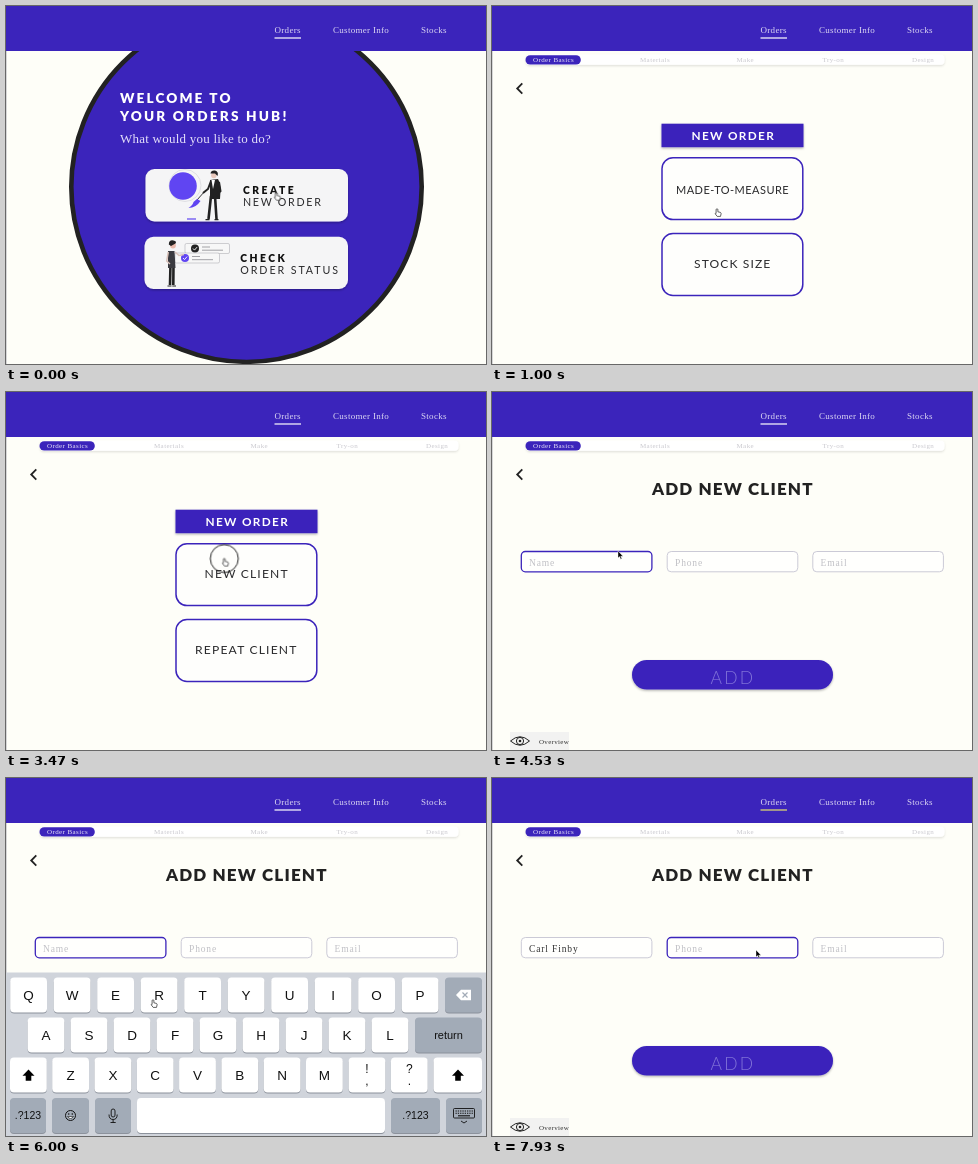
An HTML page for the animation above (8000 ms loop, 480 px wide and 358 px high).

```html
<!DOCTYPE html>
<html lang="en">
<head>
<meta charset="utf-8">
<title>Orders hub</title>
<style>
html, body { margin: 0; width: 100%; height: 100%; overflow: hidden; background: #000; }
svg { display: block; width: 100vw; height: 100vh; }
.sans { font-family: Lato, sans-serif; fill: #2a2a2c; }
.serif { font-family: "Liberation Serif", serif; }
.key { font-family: "Liberation Sans", sans-serif; fill: #111; text-anchor: middle; }
.b { font-weight: 700; }
.black { font-weight: 900; }
.light { font-weight: 300; }

/* 1% of the loop is 80 ms */
.hub, .flow, .kinds, .clients, .form, .empty, .filled, .line, .keyboard,
.cursor, .arrow, .hand, .ring { animation: 8s linear infinite; }

/* Both layers cross over black, which dims the middle of the dissolve. */
.hub { animation-name: leave; }
.flow { animation-name: enter; }
@keyframes leave { 0%, 9.125% { opacity: 1 } 12.5%, 100% { opacity: 0 } }
@keyframes enter { 0%, 9.125% { opacity: 0 } 12.5%, 100% { opacity: 1 } }

.kinds { animation-name: kinds; }
.clients { animation-name: clients; }
@keyframes kinds { 0%, 22.5% { opacity: 1 } 24.2%, 100% { opacity: 0 } }
@keyframes clients { 0%, 22.5% { opacity: 0 } 24.2%, 100% { opacity: 1 } }

.form { animation-name: form; }
@keyframes form { 0%, 44.6% { opacity: 0 } 45.8%, 100% { opacity: 1 } }

.empty { animation-name: empty; animation-timing-function: step-end; }
.filled { animation-name: filled; animation-timing-function: step-end; }
@keyframes empty { 0% { opacity: 1 } 85%, 100% { opacity: 0 } }
@keyframes filled { 0% { opacity: 0 } 85%, 100% { opacity: 1 } }

.line { animation-name: line; animation-timing-function: step-end; }
@keyframes line { 0% { stroke: #fff } 88.3%, 100% { stroke: #e6e36c } }

.keyboard { animation-name: keyboard; animation-timing-function: ease-out; }
@keyframes keyboard {
  0%, 60.5% { transform: translateY(168px) }
  65%, 82.5% { transform: none }
  86.8%, 100% { transform: translateY(168px) }
}

.cursor { animation-name: move; animation-timing-function: ease-in-out; }
@keyframes move {
  0%, 5% { transform: translate(270.3px, 186.7px) }
  10%, 34.1% { transform: translate(225px, 203px) }
  41.9%, 50% { transform: translate(218.3px, 166.6px) }
  53.1% { transform: translate(170px, 144px) }
  56.2%, 66.2% { transform: translate(126px, 159px) }
  70.6%, 75.1% { transform: translate(147px, 222px) }
  80.6%, 83.8% { transform: translate(454px, 327px) }
  88.4%, 90.9% { transform: translate(440px, 305px) }
  97.5%, 100% { transform: translate(264px, 172px) }
}
.arrow { animation-name: arrow; animation-timing-function: step-end; }
.hand { animation-name: hand; animation-timing-function: step-end; }
@keyframes arrow {
  0%, 11.5%, 60.5% { opacity: 0 }
  6.5%, 46%, 84%, 100% { opacity: 1 }
}
@keyframes hand {
  0%, 11.5%, 60.5% { opacity: 1 }
  6.5%, 46%, 84%, 100% { opacity: 0 }
}
.ring { animation-name: ring; animation-timing-function: step-end; }
@keyframes ring {
  0%, 5%, 22.3%, 45%, 59.9%, 82.6%, 100% { opacity: 0 }
  2.2%, 20%, 42.5%, 57.8%, 80.8% { opacity: 1 }
}
</style>
</head>
<body>
<svg id="stage" viewBox="0 0 480 358" preserveAspectRatio="none"></svg>
<script>
const BLUE = '#3b24bb', VIOLET = '#6045f2', PAPER = '#fefef8', DARK = '#222', GREY = '#a2abb7';

const text = (x, y, size, gap, cls, str, fill) =>
  `<text x="${x}" y="${y}" font-size="${size}" letter-spacing="${gap}" class="${cls}"` +
  `${fill ? ` style="fill:${fill}"` : ''}>${str}</text>`;
const box = (x, y, w, h, r, fill, more = '') =>
  `<rect x="${x}" y="${y}" width="${w}" height="${h}" rx="${r}" fill="${fill}" ${more}/>`;
const path = (d, stroke, width = 1, fill = 'none') =>
  `<path d="${d}" stroke="${stroke}" stroke-width="${width}" fill="${fill}"/>`;
const shape = (d, fill) => path(d, 'none', 0, fill);
const dot = (x, y, r, fill, more = '') =>
  `<circle cx="${x}" cy="${y}" r="${r}" fill="${fill}" ${more}/>`;
const group = (cls, ...parts) => `<g class="${cls}">${parts.join('')}</g>`;
const dropShadow = (id, alpha) =>
  `<filter id="${id}" x="-5%" y="-20%" width="110%" height="150%">
    <feDropShadow dx="0" dy="1.2" stdDeviation="1.2" flood-color="#000" flood-opacity="${alpha}"/>
  </filter>`;
const shadow = 'filter="url(#soft)"', faint = 'filter="url(#faint)"';

const header = () => group('',
  box(0, 0, 480, 45, 0, BLUE),
  [[268.5, 'Orders'], [327, 'Customer Info'], [415, 'Stocks']]
    .map(([x, s]) => text(x, 27, 9, .3, 'serif', s, '#dcd7f3')).join(''),
  '<path class="line" d="M268.5 32H295" stroke="#fff" stroke-width="1.2"/>',
  box(0, 45, .7, 313, 0, '#c6c6cb'));

const painter = () => group('',
  dot(179, 179.5, 16, 'none', 'stroke="#c9c9cf" stroke-width=".5"'),
  dot(177, 180, 13.8, VIOLET),
  path('M199 185L191 194', DARK, .9),
  shape('M191 193L194.5 195Q190 202 182.5 202Q187 199 187.5 196Z', VIOLET),
  path('M181 213H190', VIOLET, 1.2),
  path('M205 190L202.5 213M209 190L210.5 213', DARK, 2.6),
  path('M199.5 213.7H203.5M208.5 213.7H212.5', DARK, 1.2),
  shape('M204 174L212 173Q215.5 178 214 193H204Z', DARK),
  path('M205 175L202 183L197 187M213 176L214.5 185L210 189', DARK, 2),
  shape('M205.5 174L207 183L209 174Z', '#fff'),
  dot(207.8, 169.5, 2.7, '#e9c9bd'),
  shape('M204.5 167.5Q205 164 209 164.5Q213 165.5 211.5 170L209 167.5Z', DARK));

const notice = (x, y, color) => group('',
  box(x, y, 44.5, 10, 1.5, '#f7f7f7', 'stroke="#a2a2a8" stroke-width=".5"'),
  dot(x + 10, y + 5, 4, color),
  path(`M${x + 8} ${y + 5}l1.5 1.6 2.6-3`, '#fff', .9),
  path(`M${x + 17} ${y + 3.5}h8M${x + 17} ${y + 6.7}h21`, '#8b8b91', .8));

const checker = () => group('',
  notice(179, 237.5, DARK), notice(169, 247, VIOLET),
  path('M164.5 258L164 279M167.5 258L167.3 279', DARK, 2.6),
  path('M161.5 280H165.5M166.3 280H170', DARK, 1.1),
  shape('M162 245H168.5L169.5 262H162Z', '#3a3a40'),
  path('M162.3 246L160.7 255L164 258M169 246L173 249.5L178 248.5', '#d9c2ba', 1.5),
  dot(167, 239.5, 2.9, '#e9b9ac'),
  shape('M162.8 238.5Q163 233.5 167.5 234.5Q171 235 169.5 237.5L165 240Z', DARK));

const hub = () => group('hub',
  box(0, 0, 480, 358, 0, PAPER),
  dot(240.5, 180.8, 175.2, BLUE, `stroke="${DARK}" stroke-width="4.6"`),
  header(),
  text(114, 97, 13.6, 2.1, 'sans black', 'WELCOME TO', '#fff'),
  text(114, 115, 13.6, 2.2, 'sans black', 'YOUR ORDERS HUB!', '#fff'),
  text(114, 136.5, 13, .24, 'serif', 'What would you like to do?', '#e4dffa'),
  box(139.5, 163, 202.5, 52.5, 9, '#f5f5f6', shadow),
  box(138.5, 230.8, 203.5, 52.2, 9, '#f5f5f6', shadow),
  painter(), checker(),
  text(237, 188, 10.3, 2.5, 'sans black', 'CREATE', '#111'),
  text(237, 199.5, 10.7, 1.7, 'sans', 'NEW ORDER'),
  text(234.3, 255.5, 10.3, 2.5, 'sans black', 'CHECK', '#111'),
  text(234.3, 267.5, 10.7, 1.9, 'sans', 'ORDER STATUS'));

const tabs = () => group('',
  box(34, 48.5, 418.5, 10.3, 4, '#fff', faint),
  box(33.5, 49.2, 55.3, 9.4, 4.7, BLUE),
  text(41, 56.3, 7, .4, 'serif', 'Order Basics', '#e8e5f7'),
  [[148, 'Materials'], [244.5, 'Make'], [330.5, 'Try-on'], [420, 'Design']]
    .map(([x, s]) => text(x, 56.3, 7, .4, 'serif', s, '#c9c8ce')).join(''));

const choices = () => group('',
  box(169.5, 117.7, 142, 23.5, 0, BLUE, shadow),
  text(199.5, 134.3, 11.8, 1.35, 'sans b', 'NEW ORDER', '#fff'),
  [151.8, 227.6].map(y =>
    box(170, y, 140.8, 61.8, 11, '#fefefc', `stroke="${BLUE}" stroke-width="1.5"`)).join(''),
  group('kinds',
    text(184, 188, 11, .47, 'sans', 'MADE-TO-MEASURE'),
    text(202, 262, 12.1, 1.1, 'sans', 'STOCK SIZE')),
  group('clients',
    text(198.5, 185.8, 12.1, 1.15, 'sans', 'NEW CLIENT'),
    text(189, 261.8, 12.1, 1.2, 'sans', 'REPEAT CLIENT')));

const field = (x, label, active, ink = '#c0c0c5') => group('',
  box(x, 159.5, 130.6, 20.3, 4, '#fffffd',
    `stroke="${active ? BLUE : '#cbcad6'}" stroke-width="${active ? 1.3 : 1}"`),
  text(x + 7.8, 173.5, 9.5, .85, 'serif', label, ink));

const form = () => group('form',
  box(1, 61, 479, 297, 0, PAPER),
  text(160, 102.5, 17, 1.15, 'sans black', 'ADD NEW CLIENT', DARK),
  group('empty', field(29.3, 'Name', true), field(175.2, 'Phone', false)),
  group('filled', field(29.3, 'Carl Finby', false, '#333'), field(175.2, 'Phone', true)),
  field(320.8, 'Email', false),
  box(140, 268, 201, 29.5, 14.75, BLUE, shadow),
  text(218.5, 291.5, 17.5, 2.3, 'sans light', 'ADD', '#8173d8'),
  box(18, 340, 59, 18, 0, '#f2f2f1'),
  path('M18.5 349Q28 340.5 37.5 349Q28 357.5 18.5 349Z', DARK, 1),
  dot(28, 349, 3.6, 'none', `stroke="${DARK}"`), dot(28, 349, 1.3, DARK),
  text(47, 351.7, 7, .3, 'serif', 'Overview', '#333'));

const cap = (x, y, w, fill = '#fff') =>
  box(x, y + 1, w, 35, 4, '#8c929c') + box(x, y, w, 35, 4, fill);
const glyph = (x, y, s, size = 13.5) => text(x, y, size, 0, 'key', s);
const letters = (str, first, pitch, y) => [...str].map((s, i) => {
  const x = first + i * pitch;
  return cap(x - 18.4, y, 36.8) + glyph(x, y + 22.3, s);
}).join('');
const marks = (x, top, low) => cap(x - 18.4, 279.5, 36.8) + glyph(x, 295, top, 12) + glyph(x, 307, low, 12);
const shift = x => shape(`M${x} 291.5l6 6.3h-3.2v5h-5.6v-5h-3.2Z`, '#000');

const keyboard = () => group('keyboard',
  box(0, 194.5, 480, 166, 0, '#d0d4db'),
  letters('QWERTYUIOP', 22.6, 43.5, 199.5),
  cap(439, 199.5, 37, GREY),
  shape('M450 217L455 211.8H465V222.2H455Z', '#fff'),
  path('M456.5 214.5l5 5m0-5l-5 5', GREY, 1.2),
  letters('ASDFGHJKL', 40, 43, 239.5),
  cap(409, 239.5, 67, GREY), glyph(442.5, 260.8, 'return', 11),
  cap(4, 279.5, 36.8), shift(22.5),
  letters('ZXCVBNM', 64.6, 42.3, 279.5),
  marks(361, '!', ','), marks(403.3, '?', '.'),
  cap(427.5, 279.5, 48.5), shift(452),
  cap(4, 320, 36, GREY), glyph(22, 341.3, '.?123', 10.5),
  cap(46, 320, 37, GREY),
  dot(64.5, 337.5, 5, 'none', 'stroke="#111"'),
  dot(62.7, 336, .8, '#111'), dot(66.3, 336, .8, '#111'),
  path('M61.5 338.5Q64.5 342.5 67.5 338.5Z', '#111', .6, '#fff'),
  cap(89, 320, 36, GREY),
  box(105.2, 331, 3.8, 8, 1.9, 'none', 'stroke="#111" stroke-width=".9"'),
  path('M103 336.5Q103 341.5 107.1 341.5Q111.2 341.5 111.2 336.5M107.1 341.5V344.5M104.5 344.5H109.7', '#111', .9),
  cap(131, 320, 248),
  cap(385, 320, 49, GREY), glyph(409.5, 341.3, '.?123', 10.5),
  cap(440, 320, 36, GREY),
  box(447.5, 330.5, 21, 9.5, 1, 'none', 'stroke="#111" stroke-width=".9"'),
  '<path d="M449.5 333H467M449.5 335.3H467" stroke="#111" stroke-width="1.1" stroke-dasharray="1.3 1"/>',
  path('M452 337.8H464', '#111', 1.1),
  path('M455 343l3 2 3-2', '#111', .9));

const cursor = () => group('cursor',
  dot(0, 0, 14, 'none', `class="ring" stroke="${DARK}"`),
  group('arrow', path('M0 0V7L1.6 5.6 2.7 8.2 3.8 7.7 2.7 5.2H5Z', '#fff', .4, '#000')),
  group('hand', path('M-.9 .7a.9 .9 0 0 1 1.8 0V2.8l2.5.6q.9 .4.7 1.4L3.5 7.4H.2L-1.8 4.8q.2-.9 .9-.4Z', '#222', .7, '#fff')));

document.getElementById('stage').innerHTML =
  `<defs>${dropShadow('soft', .3)}${dropShadow('faint', .13)}</defs>` +
  hub() +
  group('flow',
    box(0, 0, 480, 358, 0, PAPER), choices(), form(), tabs(), header(),
    path('M30.3 77.3L25.2 82.5L30.3 87.7', DARK, 1.8),
    keyboard()) +
  cursor();
</script>
</body>
</html>
```
